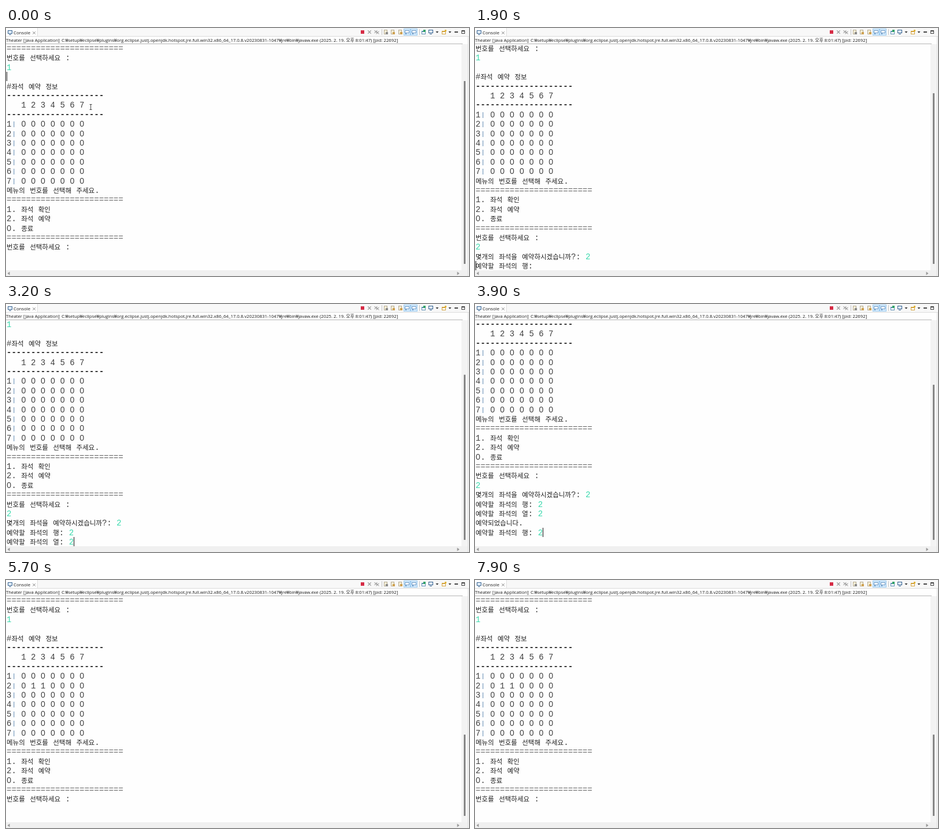
These frames come from a looping animation (800x430 px, 8 s). An HTML page with a canvas:

```html
<!DOCTYPE html>
<html lang="ko">
<head>
<meta charset="utf-8">
<style>
html, body { margin: 0; height: 100%; overflow: hidden; background: #fff; }
canvas { display: block; }
</style>
</head>
<body>
<canvas id="stage" width="800" height="430"></canvas>
<script>
const g = document.getElementById('stage').getContext('2d');
const LOOP = 8000, BLINK = 1060, ROWS = 24, PITCH = 16.4, CELL = 8.4, LEFT = 1;
const MONO = '14px "Liberation Mono", monospace';
const HANGUL = '11.5px "Noto Sans CJK KR", "Noto Sans CJK JP", sans-serif';
const STYLES = {
  '0': { font: '14px "Liberation Sans", sans-serif', dx: .3 },
  '|': { font: '11px "Liberation Mono", monospace', dx: 1.2, dy: -1, color: '#4a78a8' },
  '-': { font: 'bold ' + MONO, dy: -1, color: '#222' },
  '=': { font: MONO, color: '#606060' }
};

const rule = '='.repeat(24), dashes = '-'.repeat(20);
const ask = '번호를 선택하세요 :', done = '예약되었습니다.';
const askRow = '예약할 좌석의 행: ', askCol = '예약할 좌석의 열: ';
const menu = ['메뉴의 번호를 선택해 주세요.', rule, '1. 좌석 확인', '2. 좌석 예약', '0. 종료', rule, ask];
const seven = [1, 2, 3, 4, 5, 6, 7];
const seats = (...taken) => ['', '#좌석 예약 정보', dashes, '   ' + seven.join(' '), dashes,
  ...seven.map(r => r + '| ' + seven.map(c => +taken.includes(r * 10 + c)).join(' '))];

// Console buffer; text after "~" is typed by the user.
const lines = [rule, ask, '~1'];
const states = [];

// The program prints, leaving some empty rows at the bottom; a menu leaves two.
function show(at, gap, ...out) {
  const caret = lines.length, count = lines.push(...out), isMenu = gap === 2;
  states.push({
    at, caret, count, isMenu, typed: false,
    top: count + gap - ROWS,
    thumb: 409 - 8876 / (count + 5 + isMenu),
    blink: isMenu ? at - 600 : at
  });
}

// The user types a key, after a menu on a line of its own.
function key(at, char) {
  const last = states.at(-1);
  if (last.isMenu) lines.push('');
  lines[lines.length - 1] += '~' + char;
  states.push({ ...last, at, blink: at, typed: true, count: lines.length, caret: lines.length - 1 });
}

show(-460, 2, ...seats(), ...menu);
key(200, 2);
show(400, 1, '몇개의 좌석을 예약하시겠습니까?: ');
key(1400, 2);
show(1900, 0, askRow);
key(2300, 2);
show(2600, 0, askCol);
key(3200, 2);
show(3500, 1, done, askRow);
key(3800, 2);
show(4100, 0, askCol);
key(4400, 3);
show(4600, 2, done, ...menu);
key(5300, 1);
show(5600, 2, ...seats(22, 23), ...menu);

function rect(x, y, w, h, color) {
  g.fillStyle = color;
  g.fillRect(x, y, w, h);
}

function box(x, y, w, h, color) {
  g.strokeStyle = color;
  g.lineWidth = 1;
  g.strokeRect(x + .5, y + .5, w - 1, h - 1);
}

function line(color, width, x1, y1, x2, y2) {
  g.strokeStyle = color;
  g.lineWidth = width;
  g.beginPath();
  g.moveTo(x1, y1);
  g.lineTo(x2, y2);
  g.stroke();
}

function cross(x, y, r, color, width) {
  line(color, width, x - r, y - r, x + r, y + r);
  line(color, width, x - r, y + r, x + r, y - r);
}

// Arrowhead with its tip offset from the middle of its base
function arrow(x, y, dx, dy, half, color) {
  g.fillStyle = color;
  g.beginPath();
  g.moveTo(x + dx, y + dy);
  g.lineTo(x + (dy && half), y + (dx && half));
  g.lineTo(x - (dy && half), y - (dx && half));
  g.fill();
}

function label(text, x, y) {
  g.font = '7.75px "Open Sans", "Noto Sans CJK KR", sans-serif';
  g.fillStyle = '#1c1c1c';
  g.fillText(text, x, y);
}

// Draws mixed Latin and Hangul console text and returns its right end.
function print(text, x, y, ink) {
  for (const run of text.match(/[가-힣]+|0|\||-+|=+|[^가-힣0|=-]+/g) || []) {
    const korean = /[가-힣]/.test(run);
    const { font = korean ? HANGUL : MONO, dx = 0, dy = 0, color = ink } = STYLES[run[0]] || {};
    g.font = font;
    g.fillStyle = korean ? '#202020' : color;
    g.fillText(run, x + dx, y + dy);
    x += korean ? g.measureText(run).width : CELL * run.length;
  }
  return x;
}

function monitor(x, y) {
  rect(x, y, 8, 6, '#35618f');
  rect(x + 1, y + 1, 6, 4, '#e4f0fb');
  rect(x + 2, y + 7, 4, 1, '#35618f');
}

function page(x, accent) {
  rect(x, 3, 6, 8, '#f6efd8');
  box(x, 3, 6, 8, '#b5ab92');
  rect(x + 3, 7, 4, 4, accent);
}

function pane(x, color) {
  rect(x, 5, 7, 6, color);
  rect(x + 1, 7, 5, 3, '#fff');
}

function drawToolbar() {
  rect(613, 4, 6, 6, '#d62b45');
  cross(628, 7, 2.7, '#a3a3a3', 1.4);
  cross(639, 6.5, 2.4, '#a3a3a3', 1.2);
  cross(642, 8, 2.4, '#a3a3a3', 1.2);
  for (const x of [649, 714]) rect(x, 2, 1, 10, '#c4c4c4');
  page(653, '#8c8c8c');
  page(665, '#cfa252');
  page(678, '#cfa252');
  for (const x of [687, 699]) {
    rect(x, 1, 12, 12, '#d3e9fb');
    box(x, 1, 12, 12, '#9ccbf0');
    rect(x + 2, 4, 8, 5, '#6d9ac6');
    rect(x + 3, 5, 6, 3, '#fff');
    rect(x + 3, 9, 2, 2, '#6d9ac6');
  }
  pane(718, '#5b8cb4');
  rect(721, 3, 4, 4, '#36a36a');
  monitor(730, 3);
  pane(753, '#d2a13b');
  rect(758, 3, 3, 3, '#e2b63e');
  for (const x of [745, 767]) arrow(x, 6, 0, 2.5, 2.5, '#222');
  rect(775, 6, 6, 2, '#444');
  box(787, 4, 6, 6, '#444');
  rect(787, 4, 6, 2, '#444');
}

function drawFrame(thumb) {
  rect(0, 0, 800, 430, '#fefefe');
  rect(0, 0, 800, 15, '#f8f8f8');
  rect(0, 0, 54, 15, '#fff');
  rect(54, 0, 1, 14, '#dedede');
  rect(0, 14, 800, 1, '#dcdcdc');
  monitor(3, 4);
  label('Console', 13, 11);
  cross(48.5, 8.5, 2.2, '#666', .9);
  drawToolbar();
  label('Theater [Java Application]', 0, 23.6);
  label('C:₩setup₩eclipse₩plugins₩org.eclipse.justj.openjdk.hotspot.jre.full.win32.x86_64_17.0.8.v20230831-1047₩jre₩bin₩javaw.exe', 96, 23.6);
  label('(2025. 2. 19. 오후 8:01:47) [pid: 22692]', 542, 23.6);
  rect(0, 27, 789, 1, '#b4b4b4');
  rect(787, 28, 11, 392, '#f3f3f3');
  rect(0, 420, 798, 10, '#f0f0f0');
  rect(798, 15, 1, 415, '#dcdcdc');
  rect(791, thumb, 3, 409 - thumb, '#868686');
  arrow(6.5, 425.5, -4, 0, 3, '#9a9a9a');
  arrow(779.5, 425.5, 4, 0, 3, '#9a9a9a');
}

function drawPointer(x, y) {
  line('#444', 1, x, y - 4, x, y + 4);
  for (const end of [y - 4.5, y + 4.5]) line('#444', 1, x - 2, end, x + 2, end);
}

function draw(t) {
  const { top, count, caret, typed, thumb, blink } = states.findLast(s => s.at <= t);
  drawFrame(thumb);
  for (let i = top; i < count; i++) {
    const y = 35 + (i - top) * PITCH;
    const [text, input = ''] = lines[i].split('~');
    let x = print(text, LEFT, y + 5, '#404040');
    if (i < caret || i === caret && typed) x = print(input, x, y + 5, '#39d9ac');
    if (i === caret && (t - blink) % BLINK < BLINK / 2)
      rect(typed ? Math.round(x) : LEFT, Math.round(y - 8), 1, 16, '#111');
  }
  // Typing hides the mouse pointer.
  if (t < 200) drawPointer(146.5, 137);
}

const start = performance.now();
function tick() {
  draw((performance.now() - start) % LOOP);
  requestAnimationFrame(tick);
}
tick();
</script>
</body>
</html>
```
